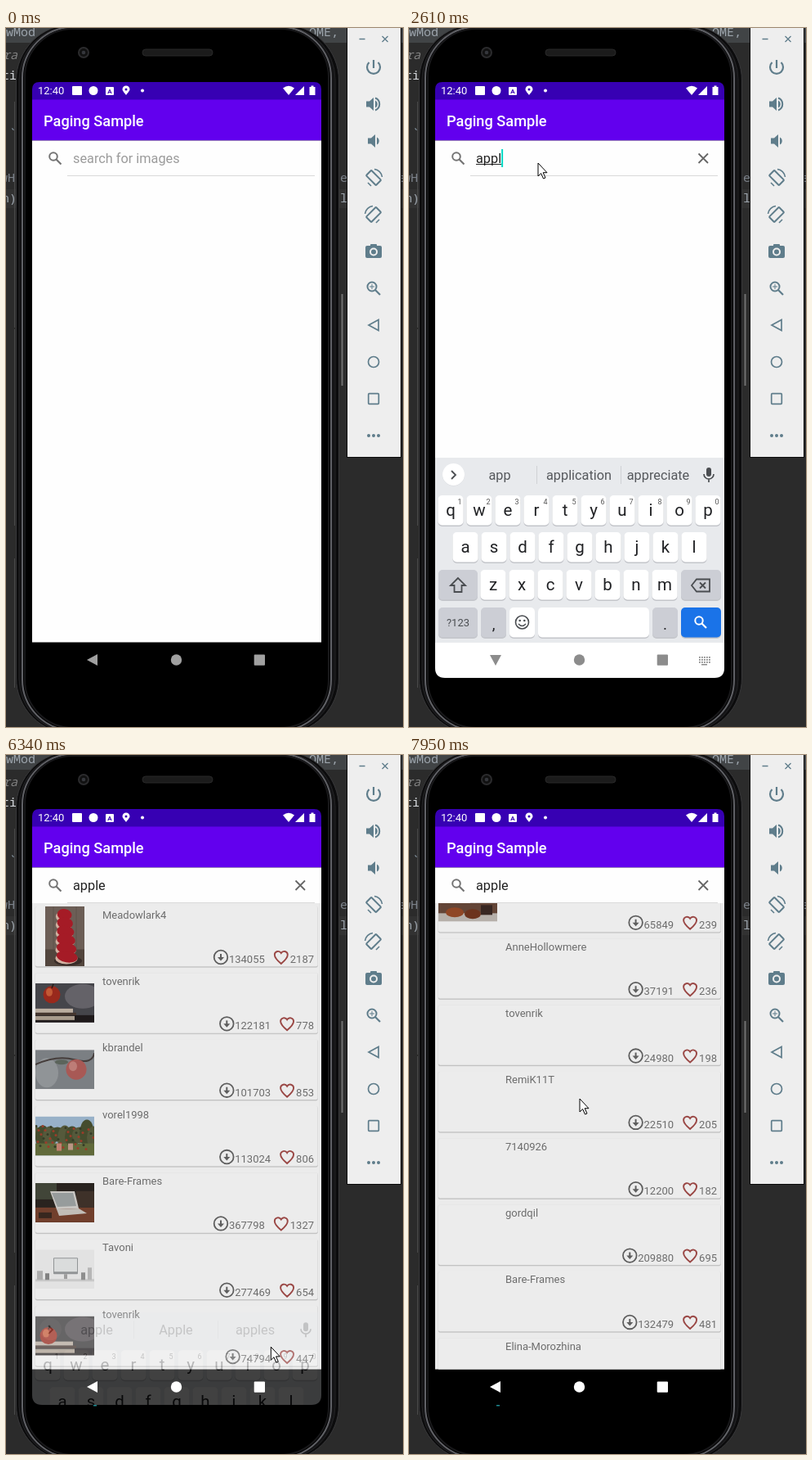
Write an HTML page that moves like this. It is 486x854 px and loops after 8000 ms.

```html
<!DOCTYPE html>
<html lang="en">
<head>
<meta charset="utf-8">
<title>Paging Sample</title>
<style>
html, body { margin: 0; width: 100%; height: 100%; overflow: hidden; background: #2b2b2b; }
#stage { display: block; width: 486px; height: 854px; }
text { font-family: Roboto, sans-serif; white-space: pre; }
.code { font-family: "Noto Sans Mono", monospace; }
</style>
</head>
<body>
<svg id="stage" viewBox="0 0 486 854"></svg>
<script>
const LOOP = 8000, PITCH = 81.35, TEAL = '#03dac5';

// Markup helpers
const rect = (x, y, w, h, fill, rx = 0, more = '') =>
  `<rect x="${x}" y="${y}" width="${w}" height="${h}" fill="${fill}" rx="${rx}" ${more}/>`;
const circ = (x, y, r, fill, more = '') => `<circle cx="${x}" cy="${y}" r="${r}" fill="${fill}" ${more}/>`;
const oval = (x, y, rx, ry, fill) => `<ellipse cx="${x}" cy="${y}" rx="${rx}" ry="${ry}" fill="${fill}"/>`;
const fillPath = (d, fill, more = '') => `<path d="${d}" fill="${fill}" ${more}/>`;
const line = (d, color, w = 1, more = '') =>
  `<path d="${d}" fill="none" stroke="${color}" stroke-width="${w}" ${more}/>`;
const text = (x, y, s, size, fill, more = '') =>
  `<text x="${x}" y="${y}" font-size="${size}" fill="${fill}" ${more}>${s}</text>`;
const at = (x, y, body, more = '') => `<g transform="translate(${x} ${y})" ${more}>${body}</g>`;
const MID = 'text-anchor="middle"';
const range = n => [...Array(n).keys()];

function backdrop() {
  const code = (x, y, s, fill, more = '') => text(x, y, s, 15, fill, `class="code" ${more}`);
  return rect(0, 0, 486, 854, '#2b2b2b') + rect(0, 0, 486, 18, '#414446') +
    rect(0, 197, 486, 23, '#323232') +
    code(0, 10, 'wMod', '#9da5ad') + code(371, 10, 'OME,', '#9da5ad') +
    code(-4, 38, 'ra', '#808080', 'font-style="italic"') + code(-5, 63, 'ti', '#d5d8dc') +
    code(4, 134, '`', '#8a9aa8') + code(-7, 188, 'wH', '#7c828a') + code(-5, 213, 'n)', '#9da5ad') +
    code(409, 188, 'e', '#7c828a') + code(409, 213, 'l', '#9da5ad') + code(480, 188, 'e', '#7c828a') +
    line('M10.5 90V366M10.5 368V608M10.5 648V806', '#4a4a4a') + line('M411.5 325V437', '#707070', 2);
}

function phone() {
  return rect(12.5, -4, 395, 866, '#0c0c0d', 68, 'stroke="#38383a"') +
    rect(16, -2, 387, 862, '#141416', 65, 'stroke="#242426"') +
    rect(20, -1, 378, 859, '#000', 62, 'stroke="#606166" stroke-width="2"') +
    rect(23, 1, 372, 854, '#000', 59, 'stroke="#18181a" stroke-width="2"') +
    circ(95, 30, 6, '#111', 'stroke="#2b2b2d" stroke-width="2"') + circ(95, 30, 2.3, '#34363b') +
    rect(167, 26, 86, 8, '#1b1b1b', 4, 'stroke="#292929"');
}

function sidePanel() {
  const c = '#5f7d8b';
  const speaker = fillPath('M-9-3.5H-5L0-8V8L-5 3.5H-9Z', c) + fillPath('M2-4.5A5 5 0 0 1 2 4.5Z', c);
  const rotate = rect(-4.5, -8.5, 9, 17, 'none', 1, `stroke="${c}" stroke-width="2" transform="rotate(-45)"`) +
    line('M1-10.5A11 11 0 0 1 10.5-1', c, 1.6) + line('M-7 6L-3 10', c, 1.6);
  const icons = [
    line('M0-9V1M-5.5-6A8 8 0 1 0 5.5-6', c, 2.2),
    speaker + line('M2-7.5A8 8 0 0 1 2 7.5', c, 2),
    at(2, 0, speaker),
    rotate,
    `<g transform="scale(-1 1)">${rotate}</g>`,
    rect(-10, -7, 20, 15, c, 2) + rect(-4, -9, 8, 4, c, 1) + circ(0, 0.5, 4, 'none', 'stroke="#eee" stroke-width="2"'),
    circ(-2, -2, 5.5, 'none', `stroke="${c}" stroke-width="2"`) + line('M2 2L8 8', c, 2.2) + line('M-5-2H1M-2-5V1', c),
    line('M-6 0L6-6.5V6.5Z', c, 1.7),
    circ(0, 0, 6.5, 'none', `stroke="${c}" stroke-width="1.7"`),
    rect(-6.3, -6.3, 12.6, 12.6, 'none', 1, `stroke="${c}" stroke-width="1.7"`),
    [-6, 0, 6].map(x => circ(x, 0, 2, c)).join('')
  ];
  return rect(417.5, -2, 66, 526.5, '#eee', 0, 'stroke="#0b0b0b"') +
    line('M432.5 13.5H439.5M460.5 10L467.5 17M467.5 10L460.5 17', c, 1.3) +
    icons.map((icon, i) => at(450, 48 + 45 * i, icon)).join('');
}

function appBars() {
  const w = '#fff';
  return rect(32, 66, 354, 22, '#3700b3') + rect(32, 87.5, 354, 50, '#6200ee') +
    text(39, 81, '12:40', 13, w) + rect(81, 71, 12, 11, w, 1) + circ(107, 76.5, 5.5, w) +
    rect(122, 72, 10, 10, w, 1) + text(127, 80, 'A', 8, '#3700b3', `${MID} font-weight="700"`) +
    fillPath('M147 82C144 78 142.5 76.5 142.5 75A4.5 4.5 0 0 1 151.5 75C151.5 76.5 150 78 147 82Z', w) +
    circ(147, 75, 1.5, '#3700b3') + circ(167, 76.5, 2, w) +
    fillPath('M346 82L339 73.5Q346 68 353 73.5Z', w) + fillPath('M354 82L365 71V82Z', w) +
    fillPath('M371.5 72H373.5V70.5H376.5V72H378.5V82H371.5Z', w) +
    text(46, 120, 'Paging Sample', 18.2, w, 'font-weight="500"');
}

function searchBar() {
  return rect(32, 137.5, 354, 43.5, '#fefefe') + rect(75, 180, 303, 1, '#d9d9d9') +
    circ(58, 157, 4.8, 'none', 'stroke="#757575" stroke-width="2"') + line('M61.5 160.5L67.5 166.5', '#757575', 2.2) +
    text(82, 165, 'search for images', 16.3, '#9b9b9b', 'id="hint"') +
    text(82, 165, '', 16.3, '#222', 'id="query"') +
    rect(82, 166, 0, 1, '#222', 0, 'id="underline"') +
    line('M354.5 153.5L366 165M366 153.5L354.5 165', '#666', 1.8, 'id="clear"') +
    rect(82, 148, 2, 22, TEAL, 0, 'id="caret"');
}

// Thumbnails, drawn around their centre and cropped to their size
const crop = (w, h, body) =>
  `<svg x="${-w / 2}" y="${-h / 2}" width="${w}" height="${h}" viewBox="${-w / 2} ${-h / 2} ${w} ${h}">${body}</svg>`;
const scene = (bg, ...parts) => crop(72, 48, rect(-36, -24, 72, 48, bg) + parts.join(''));
const appleOnBooks = (x, y, bg, glow) => scene(bg, oval(22, -8, 22, 15, glow),
  rect(-36, 15, 72, 9, '#211c1d'), rect(-36, 7, 46, 5, '#c9bbad'), rect(-36, 12, 50, 3, '#4b3a33'),
  rect(-36, 16, 48, 5, '#b5a798'), circ(x, y, 10.5, '#a52c1e'), oval(x - 3, y - 3, 4, 5, '#d2603a'),
  line(`M${x} ${y - 8}l2-5`, '#2c201a', 1.5));
const laptop = scene('#2c2622', rect(-36, 6, 72, 18, '#7a4430'), rect(-36, -24, 26, 20, '#464b3c'),
  rect(14, -14, 22, 20, '#43352c'), fillPath('M-18-14L12-14L17 7L-10 8Z', '#d9d6d2'),
  fillPath('M-16-12L10-12L14 4L-9 5Z', '#a3a8a8'), fillPath('M-10 8L17 7L27 13L-7 16Z', '#d1ccc6'),
  rect(-32, 12, 16, 7, '#3d2a22'));
const photos = [
  crop(48, 73, rect(-24, -36.5, 48, 73, '#75665d') + rect(-24, 16, 48, 20.5, '#594a42') +
    line('M-14-36V16M14-36V16', '#665850') + oval(4, 30, 17, 6, '#3d302b') +
    range(6).map(i => oval(-2 + i * 0.8, -24 + i * 10.2, 9 + i * 0.9, 7, '#e3bfae') +
      `<g transform="rotate(10)">${oval(-5 + i * 2.4, -26 + i * 10, 9 + i * 0.8, 7, '#b21d29')}</g>`).join('')),
  appleOnBooks(-16, -10, '#4b4a50', '#6c6a70'),
  scene('#85898d', oval(-22, 4, 14, 18, '#9ca0a3'), line('M-36-6Q-10-18 12-12T36-20', '#4b4240', 2),
    circ(14, 0, 12.5, '#b5605c'), oval(10, -4, 5, 6, '#cc8781'), oval(-4, -9, 8, 3, '#626c62')),
  scene('#a4bfd8', range(9).map(i => oval(-36 + i * 9, -3 + i * 5 % 7, 9, 8 + i * 7 % 10, i % 2 ? '#4a5232' : '#5c6040')).join(''),
    rect(-36, 9, 72, 15, '#697340'),
    range(40).map(i => circ(-35 + i * 37 % 71, -12 + i * 17 % 29, 1.5, i % 3 ? '#a8402c' : '#39402a')).join(''),
    rect(-10, 9, 6, 9, '#d08a78'), rect(4, 9, 6, 8, '#c9a18f')),
  laptop,
  scene('#f4f4f4', rect(-14, -14, 30, 20, '#9da0a2', 1), rect(-13, -13, 28, 16, '#eceeee'), rect(-1, 6, 4, 6, '#aaa'),
    rect(-36, 12, 72, 3, '#d9d9d9'), rect(-34, 2, 7, 11, '#bbb'), rect(-24, 5, 5, 8, '#8b8b8b'),
    rect(20, 4, 5, 9, '#999'), rect(28, -2, 5, 15, '#c5c5c5')),
  appleOnBooks(-20, 0, '#3f3b3d', '#565154'),
  laptop,
  appleOnBooks(6, -4, '#5e5a50', '#77736a'),
  scene('#8b9a72', circ(-8, 2, 13, '#b83c2e'), circ(14, 6, 12, '#c8563a')),
  scene('#6b4b3b', rect(-36, 14, 72, 10, '#c5beb8'), oval(-16, 13, 11, 6, '#9b4c28'), oval(6, 15, 10, 6, '#75371f'),
    rect(16, 4, 14, 12, '#3c2a25'))
];

const rows = [
  ['Meadowlark4', 134055, 2187], ['tovenrik', 122181, 778], ['kbrandel', 101703, 853], ['vorel1998', 113024, 806],
  ['Bare-Frames', 367798, 1327], ['Tavoni', 277469, 654], ['tovenrik', 74794, 447], ['Bare-Frames', 88120, 391],
  ['tovenrik', 70356, 312], ['kbrandel', 61274, 268], ['gordqil', 65849, 239], ['AnneHollowmere', 37191, 236],
  ['tovenrik', 24980, 198], ['RemiK11T', 22510, 205], ['7140926', 12200, 182], ['gordqil', 209880, 695],
  ['Bare-Frames', 132479, 481], ['Elina-Morozhina', 41873, 214], ['tovenrik', 30562, 187], ['kbrandel', 28417, 176]
];
const loadedAt = i => [5400, 5480, 5800, 5560, 5560, 5720, 5640][i] || 0;

function card([name, downloads, likes], i) {
  const grey = '#757575';
  const likeX = 377 - 7.3 * String(likes).length, endX = likeX - 31;
  const downX = endX - 7.3 * String(downloads).length - 10;
  return at(0, 185 + PITCH * i,
    rect(35.5, 0, 346.5, 74.5, '#000', 2, 'opacity=".07"') + rect(36, 0.5, 345.5, 74.3, '#000', 2, 'opacity=".11"') +
    rect(36, 0, 345.5, 73.3, '#fff', 2) +
    at(72, 36.5, photos[i] || '', `id="photo${i}"`) +
    line('M88 59.5A28.5 28.5 0 1 1 98.8 26.5', TEAL, 6, `id="spin${i}"`) +
    text(118, 14.5, name, 13, grey) +
    at(downX, 62, circ(0, 0, 8.3, 'none', 'stroke="#666" stroke-width="1.8"') +
      line('M0-4V1', '#666', 2) + fillPath('M-4 0H4L0 4.5Z', '#666')) +
    text(endX, 69, downloads, 13, grey, 'text-anchor="end"') +
    at(likeX - 11, 62, line('M0 8C-6 3-8 .5-8-3A4.3 4.3 0 0 1 0-5A4.3 4.3 0 0 1 8-3C8 .5 6 3 0 8Z', '#a64d4a', 1.9)) +
    text(likeX, 69, likes, 13, grey));
}

function keyboard() {
  const ink = '#202124', icon = '#4a4d51', soft = '#ccced5';
  const key = (x, y, w, fill = '#fff') => rect(x, y + 1, w, 37, '#c3c5ca', 5) + rect(x, y, w, 36.5, fill, 5);
  const letters = (s, x, y, digits) => [...s].map((c, i) => {
    const cx = x + 35 * i;
    return key(cx - 15.5, y, 31) + text(cx, y + 25, c, 20.5, ink, MID) +
      (digits ? text(cx + 11, y + 10.5, (i + 1) % 10, 9, '#555', MID) : '');
  }).join('');
  const tools = rect(75, 525, 52, 40, '#d5d7db') +
    rect(95.5, 537, 11, 14, 'none', 1, `stroke="${icon}" stroke-width="2"`) + rect(98, 534, 6, 4, icon) +
    line('M98 542H104M98 545H104M98 548H102', icon) +
    circ(152, 546, 4.5, 'none', `stroke="${icon}" stroke-width="4"`) +
    circ(152, 546, 7, 'none', `stroke="${icon}" stroke-width="2.5" stroke-dasharray="3.7 3.63"`) +
    circ(203, 546, 8, icon) + [[-4, 0], [-2, -4], [3, -4], [5, 0]].map(([x, y]) => circ(203 + x, 546 + y, 1.4, '#e8eaed')).join('') +
    line('M260 541V539H247V553H254', icon, 2) + fillPath('M253 544L261 550L256 554Z', icon) +
    line('M285.5 537V556', '#c9cbcf') + [311, 317, 323].map(x => circ(x, 546, 2, icon)).join('');
  const words = line('M156.5 535V557M259.5 535V557', '#cfd1d5') +
    [111, 208, 305].map((x, i) => text(x, 552, '', 16.3, '#55585c', `${MID} id="word${i}"`)).join('');
  return rect(32, 525, 354, 227, '#e8eaed') + rect(32, 751, 354, 43, '#fff') +
    circ(54.5, 546, 13.5, '#d6d8dc') + circ(54.5, 545.5, 13.5, '#fff') +
    line('M52 541L57 546L52 551', icon, 1.8, 'id="chevron"') +
    `<g id="tools">${tools}</g><g id="words">${words}</g>` +
    rect(364, 537, 6, 11, icon, 3) + line('M361 545A6 6 0 0 0 373 545M367 551V555', icon, 1.7) +
    letters('qwertyuiop', 51, 571, true) + letters('asdfghjkl', 69, 616) + letters('zxcvbnm', 103, 662) +
    key(36, 662, 48, soft) + line('M60 672L51 681H55.5V689H64.5V681H69Z', icon, 1.8) +
    key(333, 662, 49, soft) + line('M346 681L352 673.5H368V688.5H352ZM356 677.5L363 684.5M363 677.5L356 684.5', icon, 1.8) +
    key(36, 708, 48, soft) + text(60, 731, '?123', 13, icon, MID) +
    key(88, 708, 31, soft) + text(103.5, 735, ',', 19, ink, MID) +
    key(123, 708, 31) + circ(138.5, 726, 8, 'none', `stroke="${icon}" stroke-width="1.6"`) +
    circ(135.7, 724, 1.3, icon) + circ(141.3, 724, 1.3, icon) + line('M134 728Q138.5 733 143 728', icon, 1.5) +
    key(158, 708, 136) + key(298, 708, 31, soft) + text(313.5, 735, '.', 19, ink, MID) +
    key(333, 708, 49, '#1a73e8') + circ(355, 724, 4.7, 'none', 'stroke="#fff" stroke-width="2"') + line('M358.5 727.5L364 733', '#fff', 2.2);
}

function navBar() {
  const dots = range(15).map(i =>
    `<rect x="${355 + i % 5 * 3}" y="${768 + Math.floor(i / 5) * 3}" width="1.8" height="1.8"/>`).join('');
  return `<g id="nav"><path id="back" d="M-7 0L6-7V7Z"/><circle cx="208.5" cy="772" r="6.7"/>
    <rect x="303.7" y="765.5" width="13.3" height="13.3" rx="1"/>
    <g id="ime">${dots}<rect x="358" y="777" width="7" height="1.5"/></g></g>`;
}

const stage = document.getElementById('stage');
stage.innerHTML = `<defs>
  <clipPath id="screen"><path d="M32 75Q32 66 41 66H377Q386 66 386 75V782Q386 794 374 794H44Q32 794 32 782Z"/></clipPath>
  <clipPath id="listArea"><rect x="32" y="181" width="354" height="569.5"/></clipPath></defs>` +
  backdrop() + phone() + sidePanel() +
  `<g clip-path="url(#screen)">` + rect(32, 138, 354, 612.5, '#fefefe') +
  `<g clip-path="url(#listArea)"><g id="list">${rows.map(card).join('')}</g></g>` +
  rect(32, 181, 354, 569.5, '#000', 0, 'id="tint" opacity=".075"') +
  appBars() + searchBar() + `<g id="keys">${keyboard()}</g>` + navBar() + '</g>' +
  rect(107, 794, 4, 1.5, '#1f8a92', 0, 'id="speck"') +
  `<path id="pointer" d="M0 0V16L3.7 12.6L6.5 19L9 18L6.2 11.7H11Z" fill="#fff" stroke="#000"/>`;

const el = {};
stage.querySelectorAll('[id]').forEach(node => el[node.id] = node);
const show = (node, on) => node.style.display = on ? '' : 'none';
const set = (node, name, value) => node.setAttribute(name, value);

// Linear interpolation through [time, ...values] points
function track(points, t) {
  if (t <= points[0][0]) return points[0].slice(1);
  const i = points.findIndex(p => p[0] > t);
  if (i < 0) return points.at(-1).slice(1);
  const a = points[i - 1], b = points[i], k = (t - a[0]) / (b[0] - a[0]);
  return a.slice(1).map((v, j) => v + (b[j + 1] - v) * k);
}

const pointerPath = [[210, 375, 557], [440, 123, 109], [590, 123, 109], [670, 111, 128], [820, 142, 190],
  [990, 142, 190], [1290, 158, 165], [3740, 158, 165], [4060, 93, 803], [4290, 93, 803], [4540, 108, 775],
  [5170, 108, 775], [5640, 290, 742], [5900, 352, 728], [6250, 352, 728], [6720, 209, 703], [7220, 209, 703], [7490, 209, 420]];
const keyboardPath = [[1850, 235, 0], [1920, 196, 0.13], [2000, 100, 0.6], [2080, 35, 1], [2150, 8, 1], [2220, 0, 1],
  [6080, 0, 1], [6230, 60, 0.7], [6380, 190, 0.1], [6420, 220, 0]];
const scrollPath = [[7220, 0], [7490, 283], [7640, 510], [7800, 705], [7950, 854.85], [8000, 895]];
const keyTimes = [2300, 2450, 2530, 2610, 2820];

function draw() {
  const t = performance.now() % LOOP;
  const typed = keyTimes.filter(k => t >= k).length;
  const focused = t >= 1460 && t < 6080;

  const [px, py] = track(pointerPath, t);
  show(el.pointer, t >= 210);
  set(el.pointer, 'transform', `translate(${px} ${py})`);

  el.query.textContent = 'apple'.slice(0, typed);
  const width = typed ? el.query.getComputedTextLength() : 0;
  show(el.hint, !typed);
  show(el.clear, typed);
  set(el.underline, 'width', focused ? width : 0);
  set(el.caret, 'x', 82 + width);
  show(el.caret, focused && !(t >= 3510 && t < 3980) && !(t >= 4540 && t < 5170));

  const [drop, alpha] = track(keyboardPath, t);
  set(el.keys, 'transform', `translate(0 ${drop})`);
  set(el.keys, 'opacity', alpha);
  show(el.tools, t < 2450);
  show(el.words, t >= 2450);
  set(el.chevron, 'transform', t < 2450 ? 'rotate(180 54.5 546)' : '');
  const words = t >= 3050 ? ['apple', 'Apple', 'apples']
    : t >= 2610 && t < 2820 ? ['app', 'application', 'appreciate'] : ['', '', ''];
  words.forEach((w, i) => el['word' + i].textContent = w);

  const [turn] = track([[1960, 0], [2150, -90], [6080, -90], [6300, 0]], t);
  set(el.back, 'transform', `translate(106 772) rotate(${turn})`);
  set(el.nav, 'fill', t < 1960 ? '#a0a0a0' : t < 6250 ? '#8c8c8c' : '#fff');
  show(el.ime, t >= 1880 && t < 6300);

  set(el.list, 'opacity', track([[5170, 0], [5400, 1]], t)[0]);
  set(el.list, 'transform', `translate(0 ${-track(scrollPath, t)[0]})`);
  rows.forEach((_, i) => {
    const ready = t >= loadedAt(i);
    show(el['photo' + i], ready);
    show(el['spin' + i], !ready);
    set(el['spin' + i], 'transform', `rotate(${(t - 5640) * 0.45} 72 36.5)`);
  });
  show(el.tint, t >= 6150);
  show(el.speck, t >= 5170);
  requestAnimationFrame(draw);
}
draw();
</script>
</body>
</html>
```
